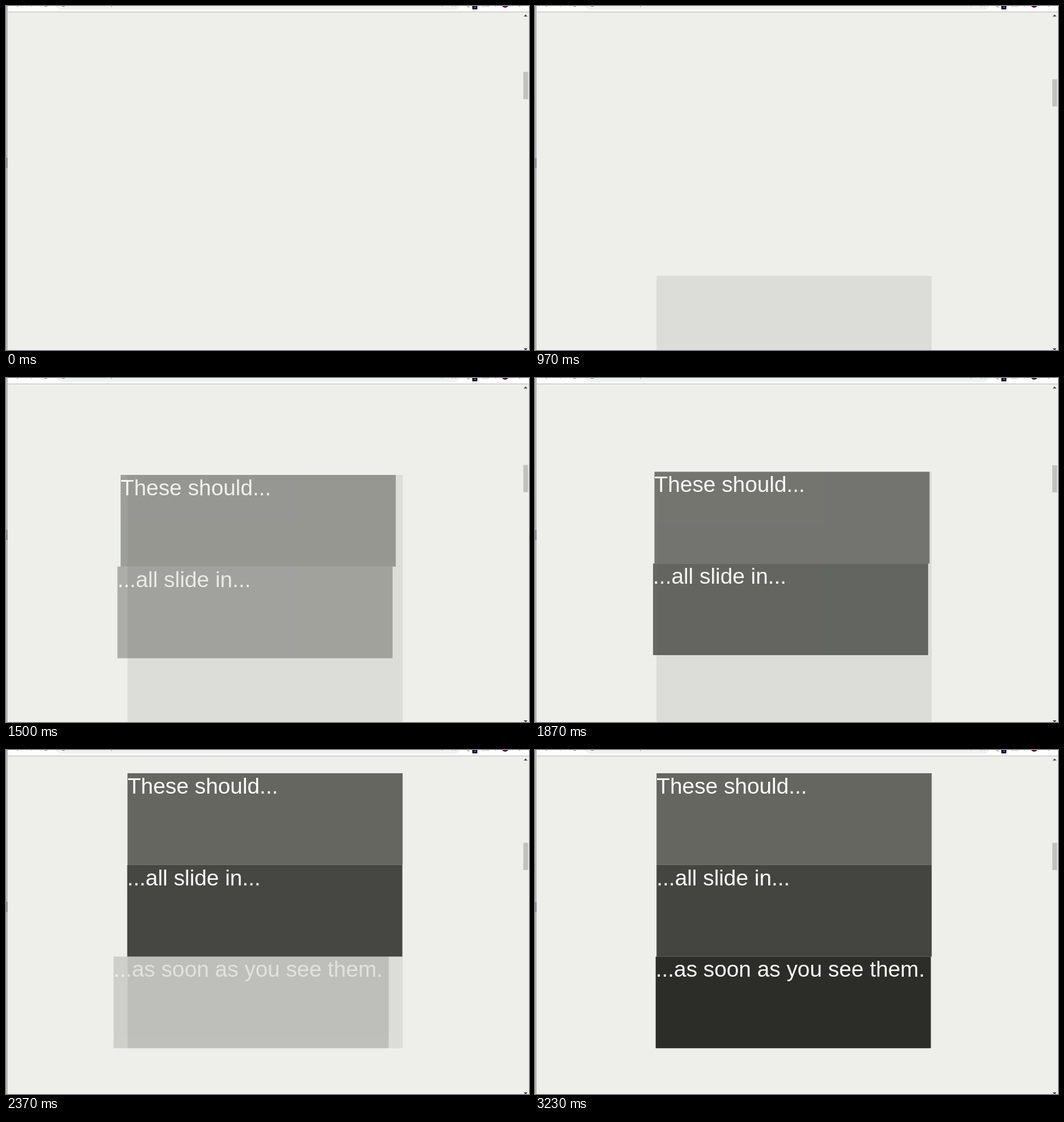
Write an HTML page that moves like this. It is 922 by 607 pixels and loops after 3260 ms.

```html
<!DOCTYPE html>
<html lang="en">
<head>
<meta charset="utf-8">
<title>Slide in on scroll</title>
<style>
  html, body { margin: 0; width: 100%; height: 100%; overflow: hidden; background: #eeefea; }
  svg { display: block; width: 922px; height: 607px; }
  text { font: 38.8px "Liberation Sans", Arial, sans-serif; fill: #fefefa; }
</style>
</head>
<body>
<svg viewBox="0 0 922 607">
  <defs><clipPath id="page"><path d="M3 11H922V607H3Z"/></clipPath></defs>
  <rect width="922" height="607" fill="#eeefea"/>
  <g clip-path="url(#page)">
    <g id="list"><rect width="485" height="485.2" fill="#dcddd8"/></g>
  </g>

  <!-- scrollbar -->
  <rect id="thumb" x="912" width="8.5" height="48" fill="#c1c1be"/>
  <path d="M912.5 18.5L916 15L919.5 18.5ZM912.5 604L916 607.5L919.5 604Z" fill="#40403e"/>

  <!-- browser toolbar -->
  <rect width="922" height="10" fill="#fefefe"/>
  <rect y="10" width="922" height="1" fill="#b4b4b4"/>
  <rect x="86" y="-20" width="717" height="26.5" rx="13" fill="#f0f1f1"/>
  <g fill="none" stroke="#77777a">
    <path d="M18 -1L21 1M66 -1Q70 2.5 74 -1M97 -1Q101 2.5 105 -1M186 -1V1.5"/>
    <path d="M44 .5H46M767 .5H770M785 .5H788M791 .5H794M862 .5H864" stroke="#c8c8ca"/>
    <path d="M813 0L817 2.5M904 0H907" />
  </g>
  <rect x="839" y="-2" width="13" height="4" rx="1" fill="#e2e2e4"/>
  <rect x="822" y="-3" width="9" height="9" rx="1.5" fill="#17122f"/>
  <rect x="826" y="1.5" width="1.5" height="1.5" fill="#c9c7d6"/>
  <circle cx="880" cy="-3" r="6" fill="#4b1838"/>

  <!-- window edge -->
  <rect width="3" height="607" fill="#b9b9bb"/>
  <rect y="268" width="3" height="18" fill="#8f9398"/>
</svg>
<script>
const LOOP = 3260, STEP = 100 / 3;
const LEFT = 214.3, ROW = 161.75, SLIDE = 29.1, DURATION = 1500;

const rows = [
  { label: 'These should...', color: '#656660', start: 997 },
  { label: '...all slide in...', color: '#444540', start: 1140 },
  { label: '...as soon as you see them.', color: '#22231e', start: 2167 },
];

// [time, top of the list]
const scroll = [
  [233, 637], [400, 600], [767, 600], [800, 596], [1000, 445], [1133, 293.5], [1300, 196],
  [1500, 171], [1867, 165.5], [2000, 151], [2167, 116], [2250, 72], [2366, 41], [3300, 41],
];

const list = document.getElementById('list');
const thumb = document.getElementById('thumb');

function add(parent, tag, attrs) {
  const el = document.createElementNS('http://www.w3.org/2000/svg', tag);
  for (const key in attrs) el.setAttribute(key, attrs[key]);
  return parent.appendChild(el);
}

rows.forEach((row, i) => {
  row.el = add(list, 'g');
  add(row.el, 'rect', { y: i * ROW, width: 485, height: ROW, fill: row.color });
  add(row.el, 'text', { y: i * ROW + 35.8 }).textContent = row.label;
});

const slope = i => (scroll[i + 1][1] - scroll[i][1]) / (scroll[i + 1][0] - scroll[i][0]);

function tangent(i) {
  if (i === 0 || i === scroll.length - 1) return 0;
  const a = slope(i - 1), b = slope(i);
  return a * b > 0 ? 2 * a * b / (a + b) : 0;
}

// Monotone cubic through the scroll points
function listTop(t) {
  if (t <= scroll[0][0]) return scroll[0][1];
  const i = scroll.findIndex(p => p[0] > t) - 1;
  const [t0, y0] = scroll[i], [t1, y1] = scroll[i + 1];
  const d = t1 - t0, u = (t - t0) / d, v = 1 - u;
  return y0 * (1 + 2 * u) * v * v + y1 * u * u * (3 - 2 * u)
    + d * u * v * (tangent(i) * v - tangent(i + 1) * u);
}

// CSS "ease": cubic-bezier(.25, .1, .25, 1)
function ease(x) {
  if (x <= 0) return 0;
  if (x >= 1) return 1;
  const curve = (s, a, b) => 3 * a * s * (1 - s) ** 2 + 3 * b * s * s * (1 - s) + s ** 3;
  let lo = 0, hi = 1;
  for (let i = 0; i < 24; i++) {
    const mid = (lo + hi) / 2;
    if (curve(mid, .25, .25) < x) lo = mid; else hi = mid;
  }
  return curve(lo, .1, 1);
}

function render(time) {
  const t = Math.floor((time % LOOP + 3.4) / STEP) * STEP;
  const top = listTop(t);
  list.setAttribute('transform', `translate(${LEFT} ${top})`);
  thumb.setAttribute('y', 143.7 + (293.5 - top) * .0795);
  for (const row of rows) {
    const p = ease((t - row.start) / DURATION);
    row.el.setAttribute('opacity', p);
    row.el.setAttribute('transform', `translate(${SLIDE * (p - 1)} 0)`);
  }
}

const begin = performance.now();
function tick() {
  render(performance.now() - begin);
  requestAnimationFrame(tick);
}
tick();
</script>
</body>
</html>
```
